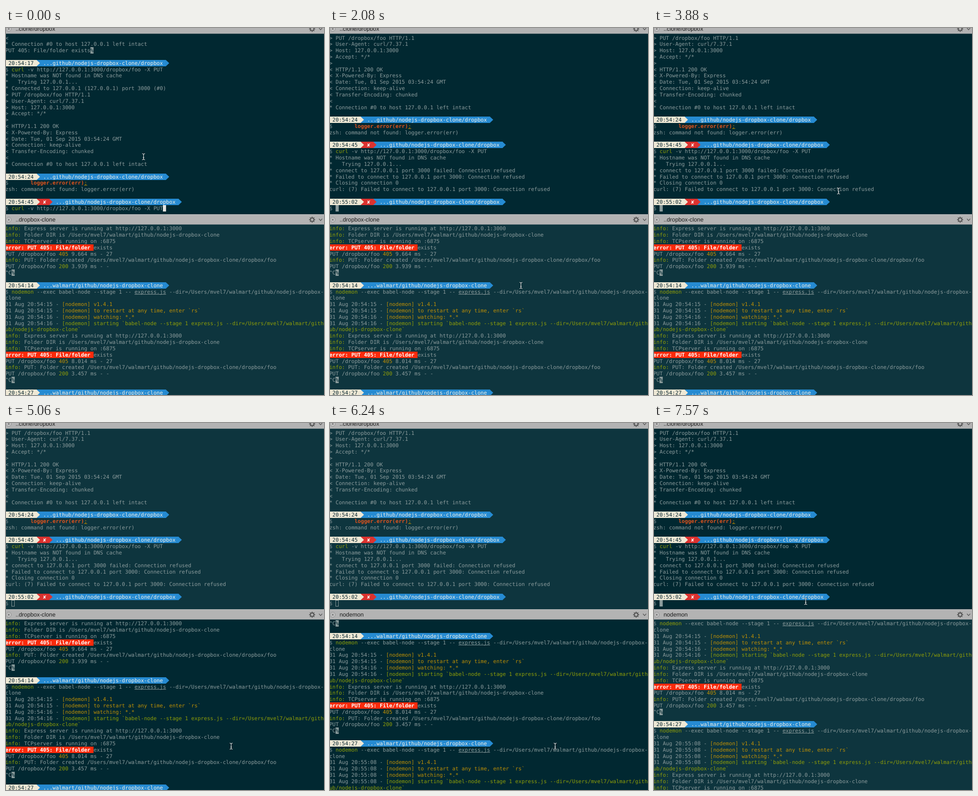
These frames come from a looping animation (697x804 px, 8 s). An HTML page with a canvas:

```html
<!DOCTYPE html>
<html lang="en">
<head>
<meta charset="utf-8">
<title>Two terminal panes</title>
<style>
  html, body { margin: 0; width: 100%; height: 100%; overflow: hidden; background: #012831; }
  canvas { display: block; }
</style>
</head>
<body>
<canvas id="stage" width="697" height="804"></canvas>
<script>
const ctx = document.getElementById('stage').getContext('2d');
const LOOP = 8000, CELL = 6.91, LINE = 13.82, LEFT = -1.6;
const MONO = '11.48px "DejaVu Sans Mono", monospace';
const TITLE = '12.7px "Liberation Sans", sans-serif';
const CREAM = '#eee8d5', BLUE = '#268bd2', RED = '#dc322f', GREY = '#8c9c9d';
const ACTIVE = '#012831', IDLE = '#0e353e';

const STYLES = {
  g: { color: '#8f9e08' },
  y: { color: '#bd8f06' },
  o: { color: '#e0531d', bold: true },
  s: { color: '#b58900', underline: true },
  u: { color: GREY, underline: true },
  d: { color: '#74868a' },
  e: { color: '#ffffff', bold: true, back: '#fb2a0b' },
  i: { color: ACTIVE, back: GREY },
};

// Rows are marked-up strings ("{style|text}") or prompt objects.
const prompt = (time, path, failed) => ({ time, path, failed });
const HOME = '/Users/mvel7/walmart/';
const REPO = HOME + 'github/nodejs-dropbox-clone';
const CLONE = '...github/nodejs-dropbox-clone/dropbox';
const SERVER = '...walmart/github/nodejs-dropbox-clone';
const CURL = '{d|$} {g|curl} -v http://127.0.0.1:3000/dropbox/foo -X PUT';
const INTACT = '* Connection #0 to host 127.0.0.1 left intact';
const LOOKUP = ['* Hostname was NOT found in DNS cache', '*   Trying 127.0.0.1...'];

const clientRows = [
  '<', INTACT, 'PUT 405: File/folder exists{i|%}', '',
  prompt('20:54:17', CLONE), CURL, ...LOOKUP,
  '* Connected to 127.0.0.1 (127.0.0.1) port 3000 (#0)',
  '> PUT /dropbox/foo HTTP/1.1', '> User-Agent: curl/7.37.1',
  '> Host: 127.0.0.1:3000', '> Accept: */*', '>',
  '< HTTP/1.1 200 OK', '< X-Powered-By: Express',
  '< Date: Tue, 01 Sep 2015 03:54:24 GMT', '< Connection: keep-alive',
  '< Transfer-Encoding: chunked', '<', INTACT, '',
  prompt('20:54:24', CLONE), '{d|$}       {o|logger.error(err)}{s|;}',
  'zsh: command not found: logger.error(err)', '',
  prompt('20:54:45', CLONE, true), CURL, ...LOOKUP,
  '* connect to 127.0.0.1 port 3000 failed: Connection refused',
  '* Failed to connect to 127.0.0.1 port 3000: Connection refused',
  '* Closing connection 0',
  'curl: (7) Failed to connect to 127.0.0.1 port 3000: Connection refused', '',
  prompt('20:55:02', CLONE, true), '{d|$}',
];

const started = [
  '{g|info:} Express server is running at http://127.0.0.1:3000',
  '{g|info:} Folder DIR is ' + REPO,
  '{g|info:} TCPserver is running on :6875',
];
const requests = (failMs, okMs) => [
  '{e|error: PUT 405: File/folder }exists',
  `PUT /dropbox/foo {y|405} ${failMs} ms - 27`,
  `{g|info:} PUT: Folder created ${REPO}/dropbox/foo`,
  `PUT /dropbox/foo {g|200} ${okMs} ms - -`,
  '^C{i|%}', '',
];
const launch = (time, first, later) => [
  prompt(time, SERVER),
  `{d|$} {g|nodemon} --exec babel-node --stage 1 -- {u|express.js} --dir=${HOME}github/nodejs-dropbox-`,
  'clone',
  `31 Aug ${first} - {y|[nodemon] v1.4.1}`,
  `31 Aug ${first} - {y|[nodemon] to restart at any time, enter \`rs\`}`,
  `31 Aug ${later} - {y|[nodemon] watching: *.*}`,
  `31 Aug ${later} - {g|[nodemon] starting \`babel-node --stage 1 express.js --dir=${HOME}gith}`,
  '{g|ub/nodejs-dropbox-clone`}',
  ...started,
];
const serverRows = [
  ...started, ...requests('9.664', '3.939'),
  ...launch('20:54:14', '20:54:15', '20:54:16'), ...requests('8.014', '3.457'),
  ...launch('20:54:27', '20:55:08', '20:55:08'),
];

// Step tables: [start ms, values...]
const clientScroll = [[0, 0, 50], [300, 7, 0], [450, 9, 2]];
const serverScroll = [[0, 0], [5210, 1], [5800, 2], [6100, 7], [7280, 10]];
const focus = [[0, 'client'], [2380, 'server'], [3880, 'client'], [5060, 'server'], [7130, 'client']];
const serverTitle = [[0, '..dropbox-clone'], [5800, 'nodemon']];
const pointer = [
  [0, 301, 282], [1200, 310, 296], [1350, 345, 340], [1500, 385, 400], [1640, 415, 460],
  [1790, 427, 510], [1930, 424, 545], [2080, 418, 564], [3430, 411, 456], [3580, 404, 357],
  [4620, 430, 470], [4770, 493, 708], [6250, 480, 670], [6400, 455, 590], [6550, 425, 500],
  [6690, 400, 430], [6840, 381, 392], [7280, 370, 392], [7430, 350, 391], [7570, 332, 391],
];
const at = (steps, t) => steps.filter(step => step[0] <= t).pop().slice(1);

const colX = col => LEFT + col * CELL;

function box(x, y, w, h, color) {
  ctx.fillStyle = color;
  ctx.fillRect(x, y, w, h);
}

function line(points, color, width) {
  ctx.beginPath();
  points.forEach(([x, y]) => ctx.lineTo(x, y));
  ctx.strokeStyle = color;
  ctx.lineWidth = width;
  ctx.stroke();
}

function write(text, col, mid, { color, bold, back, underline }) {
  const x = colX(col), width = text.length * CELL;
  if (back) box(x, mid - 7, width, 14, back);
  ctx.font = (bold ? 'bold ' : '') + MONO;
  ctx.fillStyle = color;
  [...text].forEach((ch, i) => ctx.fillText(ch, x + i * CELL, mid + 4));
  if (underline) box(x, mid + 5, width, 1, color);
}

function segment(from, to, mid, color) {
  const x = colX(to), top = mid - 7;
  box(colX(from), top, x - colX(from), 14, color);
  ctx.beginPath();
  ctx.moveTo(x - 0.5, top);
  ctx.lineTo(x + CELL, mid);
  ctx.lineTo(x - 0.5, top + 14);
  ctx.fill();
}

function drawPrompt({ time, path, failed }, mid) {
  const col = failed ? 16 : 12;
  segment(10, col + path.length + 1, mid, BLUE);
  if (failed) segment(10, 14, mid, RED);
  segment(0, 10, mid, CREAM);
  write(time, 1, mid, { color: '#0b2a33' });
  if (failed) write('✘', 12, mid, { color: '#ffffff' });
  write(path, col, mid, { color: '#f3f1e6' });
}

function drawRow(row, mid) {
  if (row.path) return drawPrompt(row, mid);
  let col = 0;
  for (const [plain, style, marked] of row.matchAll(/\{(\w)\|([^}]*)\}|[^{]+/g)) {
    const text = marked ?? plain;
    write(text, col, mid, STYLES[style] || { color: GREY });
    col += text.length;
  }
}

function drawPane(rows, first, firstMid, top, height, active) {
  box(0, top, 697, height, active ? ACTIVE : IDLE);
  rows.slice(first, first + 28).forEach((row, i) => drawRow(row, Math.round(firstMid + i * LINE)));
}

function drawCursor(col, active, bright) {
  const x = colX(col);
  if (active) return box(x, 388, CELL, 14, bright ? '#e4e6e2' : GREY);
  ctx.strokeStyle = GREY;
  ctx.lineWidth = 1;
  ctx.strokeRect(Math.round(x) + 0.5, 388.5, 6, 13);
}

function drawGear(x, y) {
  for (let i = 0; i < 8; i++) {
    const a = i * Math.PI / 4, c = Math.cos(a), s = Math.sin(a);
    line([[x + 4 * c, y + 4 * s], [x + 6.6 * c, y + 6.6 * s]], '#555', 2);
  }
  ctx.beginPath();
  ctx.arc(x, y, 3.8, 0, 7);
  ctx.lineWidth = 2.2;
  ctx.stroke();
}

function drawBar(title, mid) {
  box(0, mid - 12, 697, 22.5, '#b3b3b3');
  box(0, mid - 12, 697, 1, '#c0c0c0');
  ctx.beginPath();
  ctx.arc(6, mid, 5.5, 0, 7);
  ctx.fillStyle = '#c6c6c6';
  ctx.fill();
  ctx.strokeStyle = '#8c8c8c';
  ctx.lineWidth = 1;
  ctx.stroke();
  line([[4, mid - 2], [8, mid + 2]], '#777', 1.2);
  line([[8, mid - 2], [4, mid + 2]], '#777', 1.2);
  ctx.font = TITLE;
  ctx.fillStyle = '#1c1c1c';
  ctx.fillText(title, 21, mid + 4);
  drawGear(671, mid);
  line([[686, mid - 2], [689.5, mid + 2], [693, mid - 2]], '#555', 1.3);
}

function drawPointer(x, y) {
  const strokes = [
    [[x - 3, y - 7], [x, y - 5.5], [x + 3, y - 7]],
    [[x, y - 5.5], [x, y + 5.5]],
    [[x - 3, y + 7], [x, y + 5.5], [x + 3, y + 7]],
    [[x - 1.5, y + 2], [x + 1.5, y + 2]],
  ];
  strokes.forEach(s => line(s, 'rgba(0,20,26,.6)', 2.6));
  strokes.forEach(s => line(s, '#e8ecec', 1.2));
}

function draw(t) {
  const [focused] = at(focus, t), [first, cursorCol] = at(clientScroll, t);
  const clientActive = focused === 'client';
  ctx.textRendering = 'geometricPrecision';
  drawPane(clientRows, first, 21.5, 0, 408, clientActive);
  drawCursor(cursorCol, clientActive, first === 0);
  drawPane(serverRows, at(serverScroll, t)[0], 439.3, 408, 396, !clientActive);
  drawBar('..clone/dropbox', 2);
  drawBar(at(serverTitle, t)[0], 420);
  const [x, y] = at(pointer, t);
  drawPointer(x + 0.5, y);
}

const start = performance.now();
function tick() {
  draw((performance.now() - start) % LOOP);
  requestAnimationFrame(tick);
}
tick();
</script>
</body>
</html>
```
